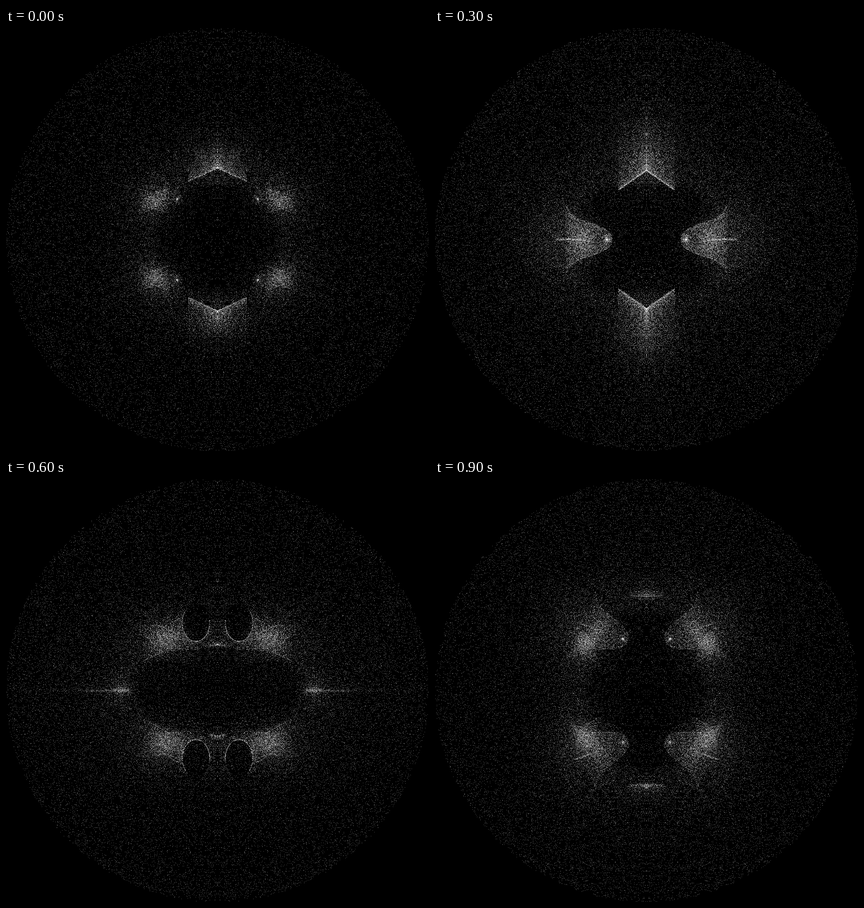
An HTML page with a canvas that plays this animation: 748x748 px, repeating every 1000 ms.

```html
<!DOCTYPE html>
<html lang="en">
<head>
<meta charset="utf-8">
<title>Point cloud</title>
<style>
html, body { margin: 0; width: 100%; height: 100%; overflow: hidden; background: #000; }
canvas { display: block; width: 748px; height: 748px; }
</style>
</head>
<body>
<canvas id="stage" width="748" height="748"></canvas>
<script>
const SIZE = 748, R = SIZE / 2, STEP = 100, STEPS = 10, TAU = 2 * Math.PI;
const ctx = document.getElementById('stage').getContext('2d');
const hits = new Uint16Array(SIZE * SIZE);
let seed = 1, dark = null;

function rnd() {
  seed = (seed + 0x6D2B79F5) | 0;
  let t = Math.imul(seed ^ (seed >>> 15), 1 | seed);
  t = (t + Math.imul(t ^ (t >>> 7), 61 | t)) ^ t;
  return ((t ^ (t >>> 14)) >>> 0) / 4294967296;
}
const times = (n, f) => { for (let i = 0; i < n; i++) f(); };
const decay = () => -Math.log(1 - rnd());
const gauss = () => Math.sqrt(2 * decay()) * Math.cos(TAU * rnd());
const rim = () => Math.sin(Math.PI * (rnd() - 0.5)); // gathers near -1 and 1

// Relative to the centre: mirrored left to right, top or bottom by chance.
function plot(x, y) {
  x = Math.abs(x);
  if (x * x + y * y >= R * R) return;
  if (dark) {
    const [cx, cy, rx, ry] = dark;
    const inside = Math.hypot((x - cx) / rx, (Math.abs(y) + cy) / ry) < 1;
    if (inside && rnd() < 0.65) return;
  }
  if (rnd() < 0.5) y = -y;
  const dx = Math.floor(x), row = (R + Math.floor(y)) * SIZE;
  hits[row + R + dx]++;
  hits[row + R - 1 - dx]++;
}

function blob(x, y, sx, sy, n) {
  times(n, () => {
    const k = 0.4 + 1.4 * rnd();
    plot(x + sx * k * gauss(), y + sy * k * gauss());
  });
}

// Plots points given in a turned local frame.
function turned(x, y, degrees) {
  const c = Math.cos(degrees * TAU / 360), s = Math.sin(degrees * TAU / 360);
  return (u, v) => plot(x + u * c - v * s, y + u * s + v * c);
}

const parts = {
  // Dust over the disc, thin in a rounded hole and thickest along its rim.
  hole(rx, ry, p, level) {
    times(R * SIZE, () => {
      const x = rnd() * R, y = (rnd() * 2 - 1) * R;
      const d = ((x / rx) ** p + (Math.abs(y) / ry) ** p) ** (1 / p);
      const open = Math.min(1, Math.max(0, (d - 0.92) / 0.16));
      const glow = 0.55 + 1.25 * Math.exp(-1.5 * Math.max(0, d - 1));
      if (rnd() < level * (0.35 + (glow - 0.35) * open)) plot(x, y);
    });
  },

  // Body with a glowing round nose, flaring into two tail cusps.
  fin(x, y, turn, len, n) {
    const put = turned(x, y, turn), k = len / 82;
    times(n * 0.75, () => {
      const s = rnd() ** 0.8, h = len * (0.48 * s ** 0.4 + 0.3 * s ** 8);
      put(s * len, h * (rnd() < 0.4 ? rim() : rnd() * 2 - 1));
    });
    times(250 + n * 0.04, () => {
      const r = 10 * rnd() ** 2.2, a = rnd() * TAU;
      put(9 + r * Math.cos(a), r * Math.sin(a));
    });
    times(n * 0.06, () => put(len * (0.65 + 0.55 * rnd()), gauss() * k));
    times(n * 0.4, () => put(len * 0.62 + 13 * k * gauss(), 18 * k * gauss()));
    times(n * 0.95, () => put(len * (1 + 0.55 * gauss()), len * 0.52 * gauss()));
  },

  // Four-cusped patch with inward sides, in a soft halo.
  star(x, y, rx, ry, turn, n) {
    const put = turned(x, y, turn);
    times(n * 0.5, () => {
      const u = rnd() * 2 - 1, w = rnd() * 2 - 1, v = rnd() < 0.16 ? Math.sign(w) : w;
      const pull = 1 - 0.42 * (1 - Math.abs(u * v));
      put(u * rx * pull * 1.08, v * ry * pull * 1.08);
    });
    times(n * 0.2, () => put(rx * 0.4 * gauss(), ry * 0.4 * gauss()));
    blob(x, y, 16 + rx * 0.6, 18 + ry * 0.6, n * 1.5);
  },

  // Chevron on the vertical axis, scattering away from the centre.
  plume(y, spread, slope, height, n) {
    times(n * 0.5, () => {
      const x = spread * rnd() ** 1.4;
      plot(x, y + slope * x - height * decay() * rnd());
    });
    times(n * 0.05, () => {
      const x = spread * rnd();
      plot(x, y + slope * x + gauss());
    });
    blob(0, y - height * 0.4, spread * 0.8, height * 0.75, n * 0.7);
  },

  // Dark oval with a bright lower rim.
  eye(x, y, rx, ry, n) {
    times(n, () => {
      const a = (rnd() * 1.3 - 0.25) * Math.PI, k = 1 + 0.5 * rnd() ** 5;
      plot(x + rx * k * Math.cos(a), y + ry * k * Math.sin(a));
    });
  },

  // Curl opening outwards, with a plume at its tip.
  horn(x, y, rx, ry, n) {
    times(n, () => {
      const a = (0.5 + rnd()) * Math.PI, k = 1 + 0.6 * rnd() ** 3;
      plot(x + rx * k * Math.cos(a), y + ry * k * Math.sin(a));
    });
    blob(x - rx / 2, y - ry * 1.35, 16, 15, n * 0.4);
  },

  // Horizontal streak with a cross at its root.
  ray(x, len, n) {
    times(n * 0.5, () => plot(x + len * decay(), 1.6 * gauss()));
    blob(x + 14, 0, 16, 17, n);
  }
};

// Key poses by step; the last value of each part is its amount.
const poses = {
  0: { hole: [110, 98, 2.2, 0.11], fin: [63, -68, -20, 48, 500], star: [112, -68, 26, 20, 0, 2600],
       plume: [-126, 52, 0.45, 32, 4000] },
  2: { hole: [140, 85, 2.2, 0.15], fin: [71, 0, 0, 104, 8500], plume: [-98, 46, 0.6, 36, 4800],
       ray: [145, 85, 1700] },
  3: { hole: [125, 98, 3, 0.14], fin: [61, 0, 0, 82, 4300], plume: [-122, 50, 0.7, 68, 7500] },
  4: { hole: [140, 152, 1.3, 0.115], fin: [68, 0, 0, 76, 4000], plume: [-160, 72, 0.65, 26, 4200],
       eye: [0, -190, 35, 29, 330] },
  6: { hole: [152, 80, 2.1, 0.125], star: [90, -94, 46, 30, 12, 5600], plume: [-80, 15, 0.2, 5, 220],
       eye: [38, -120, 24, 33, 1000], ray: [156, 45, 800] },
  8: { hole: [104, 78, 1.9, 0.17], star: [86, -97, 48, 25, -36, 6200], plume: [-82, 30, 0.35, 7, 700],
       eye: [70, -148, 17, 36, 750], horn: [97, -165, 45, 60, 1500] },
  9: { hole: [104, 140, 3, 0.12], fin: [33, -88, -20, 84, 4200], star: [108, -82, 26, 26, -12, 3200],
       plume: [-166, 28, 0, 12, 600] }
};

// A part missing on one side fades by its amount.
function between(a, b) {
  const mixed = {};
  for (const name of Object.keys(parts)) {
    const p = a[name], q = b[name];
    if (!p && !q) continue;
    const from = p || [...q.slice(0, -1), 0], to = q || [...p.slice(0, -1), 0];
    mixed[name] = from.map((v, i) => (v + to[i]) / 2);
  }
  return mixed;
}

function render(i) {
  const pose = poses[i] || between(poses[i - 1], poses[i + 1]);
  hits.fill(0);
  seed = 977 * (i + 1);
  dark = pose.eye || null;
  for (const name of Object.keys(pose)) parts[name](...pose[name]);
  const img = ctx.createImageData(SIZE, SIZE), px = new Uint32Array(img.data.buffer);
  for (let j = 0; j < px.length; j++) {
    const v = Math.round(255 * (1 - Math.exp(-0.3 * hits[j])));
    px[j] = (0xFF000000 | v << 16 | v << 8 | v) >>> 0;
  }
  return img;
}

const start = performance.now(), cache = [];
let shown = -1;

function tick() {
  const i = Math.floor((performance.now() - start) / STEP) % STEPS;
  if (i !== shown) {
    cache[i] = cache[i] || render(i);
    ctx.putImageData(cache[i], 0, 0);
    shown = i;
  }
  requestAnimationFrame(tick);
}
tick();
</script>
</body>
</html>
```
